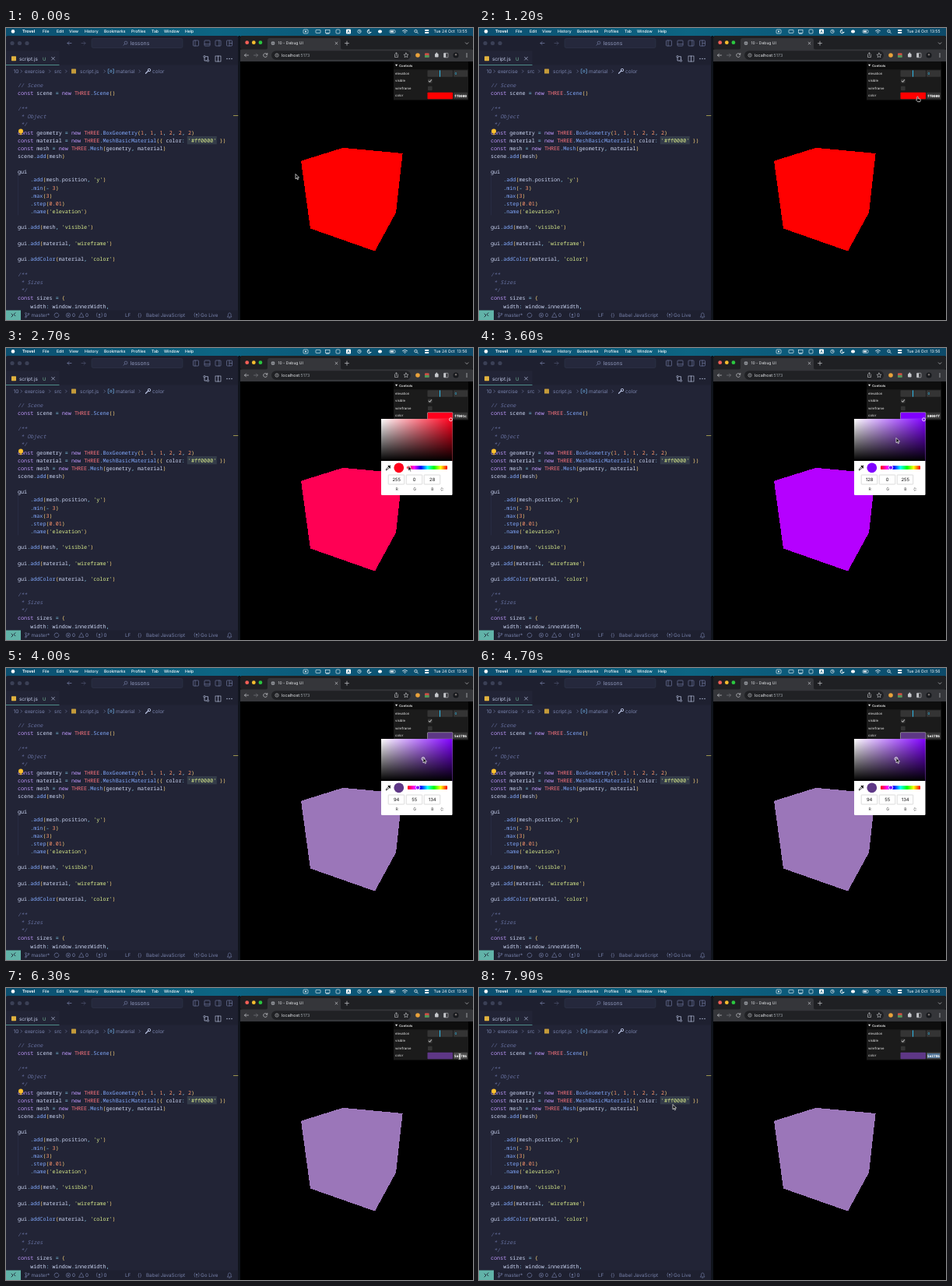
An HTML page that plays this animation: 600 px wide and 375 px high, repeating every 8000 ms.

```html
<!DOCTYPE html>
<html lang="en">
<head>
<meta charset="utf-8">
<title>Debug UI</title>
<style>
  html, body { margin: 0; width: 100%; height: 100%; overflow: hidden; background: #000; }
  svg { display: block; width: 100vw; height: 100vh; }
  text { font-family: Inter, "Open Sans", sans-serif; white-space: pre; text-rendering: geometricPrecision; }
  .code { font: 500 6.75px "Noto Sans Mono", "DejaVu Sans Mono", monospace; }
  .mono { font-family: "Noto Sans Mono", "DejaVu Sans Mono", monospace; }
  .line { fill: none; stroke-linecap: round; stroke-linejoin: round; }
</style>
</head>
<body>
<svg id="stage" viewBox="0 0 600 375" preserveAspectRatio="none">
  <defs>
    <linearGradient id="menu">
      <stop offset="0" stop-color="#0b4f70"/><stop offset=".45" stop-color="#0d6583"/>
      <stop offset=".7" stop-color="#0b5878"/><stop offset="1" stop-color="#0d4a69"/>
    </linearGradient>
    <linearGradient id="white"><stop stop-color="#fff"/><stop offset="1" stop-color="#fff" stop-opacity="0"/></linearGradient>
    <linearGradient id="black" x2="0" y2="1"><stop stop-opacity="0"/><stop offset="1"/></linearGradient>
    <linearGradient id="hues"></linearGradient>
  </defs>
</svg>
<script>
const NS = 'http://www.w3.org/2000/svg';
const stage = document.getElementById('stage');

function add(tag, attrs, parent = stage) {
  const el = document.createElementNS(NS, tag);
  for (const k in attrs) el.setAttribute(k, attrs[k]);
  parent.append(el);
  return el;
}
const box = (x, y, width, height, fill, more, parent) =>
  add('rect', { x, y, width, height, fill, ...more }, parent);
const dot = (cx, cy, r, fill, more, parent) => add('circle', { cx, cy, r, fill, ...more }, parent);
const line = (d, stroke, width = .7, parent) =>
  add('path', { d, stroke, 'stroke-width': width, class: 'line' }, parent);
function label(str, x, y, size, fill, more, parent) {
  const el = add('text', { x, y, 'font-size': size, fill, ...more }, parent);
  el.textContent = str;
  return el;
}
const frame = (x, y, w, h, stroke, more) =>
  box(x, y, w, h, 'none', { stroke, 'stroke-width': .6, ...more });
const ring = (x, y, r, stroke, width = .6) => dot(x, y, r, 'none', { stroke, 'stroke-width': width });
const cross = (x, y, r, color) =>
  line(`M${x - r} ${y - r}L${x + r} ${y + r}M${x + r} ${y - r}L${x - r} ${y + r}`, color);

function drawMenu() {
  box(0, 0, 600, 11, 'url(#menu)');
  dot(9, 4.4, 2.3, '#fff');
  label('Trovel', 21, 6.3, 5.3, '#fff', { 'font-weight': 700 });
  const items = { File: 47, Edit: 65, View: 81, History: 101, Bookmarks: 126, Profiles: 161, Tab: 187, Window: 203, Help: 230 };
  for (const name in items) label(name, items[name], 6.3, 5.1, '#fff', { 'font-weight': 500 });

  frame(382, 2, 6, 5, '#fff', { rx: 1 });
  dot(385, 4.5, 1, '#fff');
  frame(398, 2.4, 6, 4, '#fff', { rx: .6 });
  frame(410.5, 2.4, 5.5, 3.8, '#fff');
  line('M411.5 7.2h3.5', '#fff');
  frame(424, 2, 5, 5, '#fff', { rx: 1 });
  box(437, 1.5, 6, 6, '#fff', { rx: 1 });
  line('M438.8 6l1.2-3 1.2 3', '#0b5878');
  ring(454, 4.4, 2.2, '#fff');
  line('M454 3v1.5h1', '#fff', .6);
  line('M468.8 5.5a2.4 2.4 0 1 1-2-3.4 2 2 0 0 0 2 3.4z', '#fff', .9);
  frame(493, 2.7, 7, 3.6, '#fff', { rx: 1 });
  box(494, 3.6, 4, 1.8, '#fff');
  box(478, 2.5, 5, 4, '#fff', { rx: 2 });
  line('M509.5 3.6q3-2.6 6 0M511 5.1q1.5-1.3 3 0M512.5 6.5v.1', '#fff', .8);
  ring(526.5, 4, 1.7, '#fff', .7);
  line('M527.8 5.3l1.6 1.6', '#fff');
  box(538, 2, 5.4, 2, '#fff', { rx: 1 });
  box(538, 4.9, 5.4, 2, '#fff', { rx: 1 });
}

const CODE = `// Scene
const scene = new THREE.Scene()

/**
 * Object
 */
const geometry = new THREE.BoxGeometry(1, 1, 1, 2, 2, 2)
const material = new THREE.MeshBasicMaterial({ color: '#ff0000' })
const mesh = new THREE.Mesh(geometry, material)
scene.add(mesh)

gui
    .add(mesh.position, 'y')
    .min(- 3)
    .max(3)
    .step(0.01)
    .name('elevation')

gui.add(mesh, 'visible')

gui.add(material, 'wireframe')

gui.addColor(material, 'color')

/**
 * Sizes
 */
const sizes = {
    width: window.innerWidth,`;

// One capture group per colour, in the same order.
const TOKEN = /(^\/[/*].*|^ \*.*)|('[^']*')|\b(const|new)\b|\b(THREE)\b|(\d[\d.]*)|([=.,:-])|(\w+(?=\())|([(){}]+)/g;
const COLORS = ['#66709f', '#dcef8c', '#c099ff', '#ff757f', '#ff966c', '#86d6f5', '#82aaff', '#f5cf78'];
const PLAIN = '#cdd7f5';

function drawCode() {
  line('M15.5 190v50', '#2c3250', .5);
  box(232.8, 139, 38, 10.3, '#343c49');
  CODE.split('\n').forEach((src, i) => {
    if (!src) return;
    const row = add('text', { x: 15, y: 75.7 + i * 10.14, class: 'code' });
    const span = (str, fill, italic) => {
      if (!str) return;
      const el = add('tspan', { fill }, row);
      if (italic) el.setAttribute('font-style', 'italic');
      el.textContent = str;
    };
    let at = 0;
    for (const m of src.matchAll(TOKEN)) {
      const kind = m.slice(1).findIndex(Boolean);
      span(src.slice(at, m.index), PLAIN);
      span(m[0], COLORS[kind], kind === 0);
      at = m.index + m[0].length;
    }
    span(src.slice(at), PLAIN);
  });
  dot(19, 132.6, 3, '#ffc02e');
  box(17.7, 135.6, 2.6, 1.6, '#e5a92a');
}

function drawEditor() {
  const soft = '#7882ab', bar = '#1e2030', body = '#222436';
  box(0, 10, 298.5, 365, body, { rx: 3 });
  box(0, 10, 298.5, 20, bar, { rx: 3 });
  box(0, 29.5, 298.5, 18, bar);
  for (const x of [8, 17.5, 27]) dot(x, 19.5, 2.6, '#3b4056');
  line('M84 19.5h-5m2-2l-2 2 2 2', soft);
  line('M97 19.5h5m-2-2l2 2-2 2', '#4c5270');
  box(110, 13.5, 117, 12, '#25283c', { rx: 2, stroke: '#33384f', 'stroke-width': .5 });
  ring(154, 19, 1.9, soft);
  line('M152.6 20.5l-1.6 1.6', soft);
  label('lessons', 159.5, 22, 6.9, '#8c95b8');
  for (const x of [240.5, 255, 269, 283.5]) frame(x, 16, 7, 7, soft, { rx: .8 });
  line('M243 16v7M255 20.7h7M273.8 16v7M287 16v7M287 19.5h3.5', soft, .6);

  box(0, 29.5, 68.5, 18, body);
  box(0, 47.3, 68.5, .7, '#61b8ad');
  box(7, 36.2, 6, 6, '#e0b13e', { rx: .6 });
  label('script.js', 17, 41.6, 6.4, '#c2cbe8');
  label('U', 47, 41.6, 6, '#74b99a');
  cross(60.5, 39.2, 1.9, '#b4bddc');
  ring(255, 36.7, 1.2, '#c2cbe8');
  ring(259.5, 42, 1.2, '#c2cbe8');
  line('M255 38v4h2.8M259.5 40.7v-4h-2.8', '#c2cbe8');
  frame(269, 36, 7, 7, '#c2cbe8');
  line('M272.5 36v7', '#c2cbe8');
  for (const x of [284, 287, 290]) dot(x, 39.5, .7, '#c2cbe8');

  const crumbs = { 10: 9.5, exercise: 24, src: 62, 'script.js': 95, material: 141, color: 188 };
  for (const name in crumbs) label(name, crumbs[name], 57.7, 6.5, soft);
  for (const x of [19, 55.5, 76.5, 126, 171]) line(`M${x} 54l1.6 1.6-1.6 1.6`, soft, .6);
  box(84, 52.6, 6, 6, '#c49b3a', { rx: .6 });
  line('M132.5 52.8h-1.3v5.4h1.3M137.2 52.8h1.3v5.4h-1.3', '#6aa5d8');
  ring(134.9, 55.5, 1.3, '#6aa5d8', .8);
  line('M179.5 58.3l3.5-3.5', '#b4bddc', 1.3);
  ring(184, 54, 1.7, '#b4bddc', 1);

  drawCode();
  box(292, 112, 6.5, .9, '#a9a04f');

  box(0, 362.5, 298.5, 12.5, bar);
  box(0, 362.5, 19, 12.5, '#61b3a8');
  line('M7 367l2 2-2 2M12 365.8l-2 2 2 2', bar, .9);
  const status = { 'master*': 32.5, '0': 85, '{}': 169, 'Babel JavaScript': 180, LF: 153, 'Go Live': 250 };
  for (const name in status) label(name, status[name], 371, 6.3, soft);
  label('0', 102, 371, 6.3, soft);
  label('0', 125.5, 371, 6.3, soft);
  for (const [x, y] of [[25.5, 366.5], [25.5, 371], [29, 367.3]]) ring(x, y, 1, soft);
  line('M25.5 367.5v2.5M29 368.3q0 1.2-3 1.6', soft, .6);
  line('M62 369a3 3 0 0 1 5.5-1.7M68 368.6a3 3 0 0 1-5.5 1.7', soft);
  ring(80, 368.8, 2.7, soft);
  cross(80, 368.8, 1, soft);
  line('M97 366l3 5.4h-6z', soft, .6);
  line('M117 366q-1.4 2.5 0 5M123 366q1.4 2.5 0 5M120 368.5v3M118.7 371.5h2.6', soft, .6);
  dot(120, 368, .9, soft);
  line('M242.5 366q-1.4 2.5 0 5M247.5 366q1.4 2.5 0 5M245 368.5v3', soft, .6);
  dot(245, 368, .9, soft);
  line('M284.5 371h5.5l-.9-1.4v-1.7q-.2-2-1.8-2t-1.9 2v1.7zM286.6 372.2h1.3', soft, .6);
}

function drawBrowser() {
  const pale = '#c6c8cc';
  box(298.5, 10, 2.5, 365, '#10141c');
  box(301, 10, 299, 365, '#000', { rx: 3 });
  box(301, 10, 299, 18, '#1f2023', { rx: 3 });
  ['#f35f57', '#f5bd2f', '#2bc840'].forEach((c, i) => dot(309.7 + i * 8.6, 18.7, 2.4, c));
  add('path', { d: 'M333 28q3 0 3-3v-9q0-3 3-3h88q3 0 3 3v9q0 3 3 3z', fill: '#35363a' });
  dot(343, 19.6, 2.4, '#a7abb1');
  line('M340.8 19.6h4.4M343 17.4v4.4', '#35363a', .5);
  label('10 - Debug UI', 349.5, 21.4, 5, '#e8eaed');
  cross(424.5, 19.6, 1.4, pale);
  line('M435.5 19.6h5M438 17.1v5', pale);
  line('M590.3 18.8l1.8 1.8 1.8-1.8', pale);

  box(301, 27.5, 299, 15.5, '#35363a');
  line('M311.5 35h-5m2-2l-2 2 2 2', pale);
  line('M318.5 35h5m-2-2l2 2-2 2', '#777a7f');
  line('M335.5 34a2.5 2.5 0 1 0 0 2M335.8 32.3v1.8h-1.8', pale);
  box(341, 29.2, 179, 11.6, '#202124', { rx: 5.8 });
  ring(348, 35, 2.2, pale);
  line('M348 34.8v1M348 33.8v.1', pale, .6);
  const url = label('localhost', 354, 36.9, 5.4, '#e8eaed');
  add('tspan', { fill: '#9aa0a6' }, url).textContent = ':5173';
  line('M499.5 34v3.5h4V34M501.5 35.5v-3.8l-1.2 1.2m1.2-1.2l1.2 1.2', pale, .6);
  line('M514 32l.9 2 2.1.2-1.6 1.4.5 2.1-1.9-1.1-1.9 1.1.5-2.1-1.6-1.4 2.1-.2z', pale, .6);
  dot(529, 35, 2.8, '#e9a23b');
  box(538, 32.2, 5.6, 5.6, '#c95145', { rx: 1 });
  box(538, 35, 5.6, 2.8, '#4b9a5b');
  box(551, 33, 4.6, 4.6, pale, { rx: .8 });
  dot(553.3, 32.6, 1.1, pale);
  frame(562.5, 32.3, 5.5, 5.5, pale, { rx: .6 });
  box(562.5, 32.3, 2.7, 5.5, pale);
  dot(578, 35, 3.6, '#17191d');
  dot(578, 34.2, 1.2, '#77706e');
  for (const y of [33, 35, 37]) dot(592, y, .65, pale);
}

const FIELD = '#343434';

function drawPanel() {
  box(498, 43.5, 96, 49, '#1b1b1b');
  box(498, 43.5, 96, 9.7, '#0e0e0e');
  add('path', { d: 'M500 46.8h3.2l-1.6 2.4z', fill: '#ebebeb' });
  label('Controls', 505, 49.7, 4.2, '#ebebeb', { 'font-weight': 600 });
  ['elevation', 'visible', 'wireframe', 'color'].forEach((name, i) =>
    label(name, 500, 59.9 + i * 9.45, 4.3, '#ebebeb'));
  box(541.5, 54.3, 32.5, 8.4, FIELD, { rx: .8 });
  box(557, 54.3, .9, 8.4, '#2cc9ff');
  box(575, 54.3, 18, 8.4, FIELD, { rx: .8 });
  label('0', 576.5, 60.1, 4.3, '#2cc9ff');
  for (const y of [65.2, 74.7]) box(542, y, 5.6, 5.6, FIELD, { rx: .8 });
  line('M543.3 68.1l1.2 1.3 2-2.7', '#fff', .8);
}

drawMenu();
drawEditor();
drawBrowser();
const cube = add('polygon', {
  points: '379,170.7 433,153.8 509.6,161 501,237 474,286.6 391,257.5',
  'shape-rendering': 'crispEdges',
});
drawPanel();
const swatch = box(541.5, 82.7, 32.5, 8.6, '#f00', { rx: .8, 'stroke-width': .6 });
const hexBox = box(575, 82.7, 18, 8.6, FIELD, { rx: .8 });
const hexMark = box(576, 84, 16, 6, '#4d7195');
const hexText = label('', 576, 88.6, 4.45, '#fff', { class: 'mono', 'font-weight': 600 });

const picker = add('g', {});
box(482, 91, 91.5, 98, '#fff', { rx: 1.2 }, picker);
const hueArea = box(482, 91, 91.5, 54, '#f00', {}, picker);
for (const fill of ['url(#white)', 'url(#black)']) box(482, 91, 91.5, 54, fill, {}, picker);
for (let i = 0; i <= 6; i++)
  add('stop', { offset: i / 6, 'stop-color': `hsl(${360 - i * 60},100%,50%)` }, document.getElementById('hues'));
box(516, 151.2, 51, 4.8, 'url(#hues)', { rx: .8 }, picker);
line('M488.4 156.6l.5-1.6 2.7-2.7 1.1 1.1-2.7 2.7z', '#111', .8, picker);
line('M491.4 151.6l2 2M492.6 152.4l.9-.9', '#111', 1.5, picker);
const sample = dot(504.8, 153.8, 6.4, '#f00', {}, picker);
const hueKnob = dot(516, 153.6, 2.6, '#f00', { stroke: '#fff', 'stroke-width': 1 }, picker);
const toneKnob = dot(0, 0, 2, 'none', { stroke: '#fff', 'stroke-width': .8 }, picker);
const fields = [501.7, 524.7, 547.7].map((x, i) => {
  box(x - 10.5, 163, 20.5, 12, '#fff', { stroke: '#c4c4c4', 'stroke-width': .6, rx: .5 }, picker);
  const mid = { 'text-anchor': 'middle' };
  label('RGB'[i], x + .3, 183.2, 5, '#333', mid, picker);
  return label('', x, 171.2, 5.9, '#111', mid, picker);
});
line('M558.9 180.7l1.2-1.2 1.2 1.2M558.9 182.2l1.2 1.2 1.2-1.2', '#333', .6, picker);

const cursor = add('g', {});
const shape = (d, fill, stroke) =>
  add('path', { d, fill, stroke, 'stroke-width': .7, 'stroke-linejoin': 'round' }, cursor);
const pointers = {
  arrow: shape('M0-2.5v6.3l1.5-1.3 1 2.3 1-.5-1-2.2h2z', '#000', '#fff'),
  hand: shape('M-1.2-2.5q.8-.9 1.4 0v2.2l2.4.5q.9.3.7 1.3l-.6 2.2h-3l-2-2.4q0-1 1.1-.6z', '#000', '#fff'),
  text: shape('M-1.4-3.6q1.4 0 1.4.7v5.8q0 .7-1.4.7M1.4-3.6q-1.4 0-1.4.7v5.8q0 .7 1.4.7', 'none', '#fff'),
};

// time, x, y
const PATH = [
  [0, 372, 190], [300, 372, 190], [1000, 562, 92], [1200, 564, 91], [1600, 564, 91],
  [2000, 538, 139], [2400, 516, 154], [2600, 516, 154], [3200, 529, 154], [3500, 536, 118],
  [4800, 536, 118], [5300, 545, 205], [5600, 545, 205], [6100, 583, 88], [6800, 583, 88],
  [7600, 249, 152], [8000, 249, 152],
];
const LOOP = 8000, STEP = 100;
const OPEN = 1600, CLOSE = 5500, TONE = 3900, SELECT = 6600, MINUTE = 1900;

const clock = label('', 592.5, 6.3, 5.2, '#fff', { 'text-anchor': 'end' });
const clamp = v => Math.min(1, Math.max(0, v));
const ease = p => p * p * (3 - 2 * p);
const css = rgb => `rgb(${rgb.map(Math.round)})`;

function pointAt(t) {
  const i = Math.max(1, PATH.findIndex(k => k[0] > t));
  const [t0, x0, y0] = PATH[i - 1], [t1, x1, y1] = PATH[i];
  const p = ease(clamp((t - t0) / (t1 - t0)));
  return [x0 + (x1 - x0) * p, y0 + (y1 - y0) * p];
}

const hsv = (h, s, v) => [5, 3, 1].map(n => {
  const k = (n + h / 60) % 6;
  return Math.round(255 * v * (1 - s * Math.max(0, Math.min(k, 4 - k, 1))));
});

function pose(t) {
  const slide = ease(clamp((t - 2600) / 600));
  const hue = 360 - 90 * slide;
  const [s, v] = t < TONE ? [1, 1] : [.59, .525];
  const rgb = hsv(hue, s, v);
  const color = css(rgb), pure = css(hsv(hue, 1, 1));
  const open = t >= OPEN && t < CLOSE;

  cube.setAttribute('fill', css(rgb.map(c => Math.sqrt(c / 255) * 255)));
  swatch.setAttribute('fill', color);
  swatch.setAttribute('stroke', open ? '#b8b8b8' : 'none');
  hexText.textContent = rgb.map(c => c.toString(16).padStart(2, '0')).join('');
  hexMark.setAttribute('visibility', t >= SELECT ? 'visible' : 'hidden');
  hexBox.setAttribute('fill', t >= 6100 ? '#4a4a4a' : FIELD);

  picker.setAttribute('visibility', open ? 'visible' : 'hidden');
  hueArea.setAttribute('fill', pure);
  sample.setAttribute('fill', color);
  hueKnob.setAttribute('fill', pure);
  hueKnob.setAttribute('cx', 516.3 + 12.75 * slide);
  toneKnob.setAttribute('cx', t < TONE ? 571.5 : 536);
  toneKnob.setAttribute('cy', t < TONE ? 91.8 : 116.6);
  fields.forEach((el, i) => el.textContent = rgb[i]);

  const [x, y] = pointAt(t);
  cursor.setAttribute('transform', `translate(${x} ${y})`);
  const kind = t >= 900 && t < 1700 ? 'hand' : t >= 6000 && t < 6900 ? 'text' : 'arrow';
  for (const k in pointers) pointers[k].setAttribute('visibility', k === kind ? 'visible' : 'hidden');
  clock.textContent = 'Tue 24 Oct  13:' + (t < MINUTE ? 55 : 56);
}

const start = performance.now();
function tick() {
  const t = (performance.now() - start) % LOOP;
  pose(Math.floor(t / STEP) * STEP);
  requestAnimationFrame(tick);
}
tick();
</script>
</body>
</html>
```
